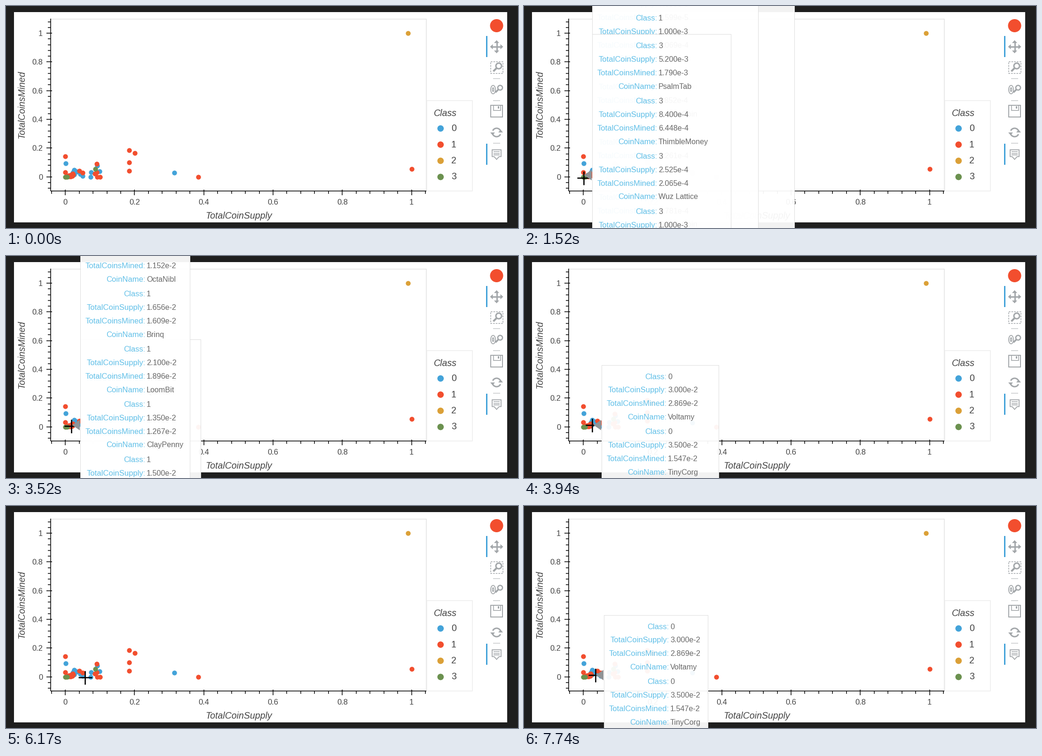
Recreate the animation shown at these times as a matplotlib script. Size 1089x474 px, loop 8 s.

```python
import math
import random

import numpy as np
import matplotlib.pyplot as plt
from matplotlib.animation import FuncAnimation
from matplotlib.collections import LineCollection
from matplotlib.patches import Arc, Circle, Ellipse, Polygon, Rectangle

W, H, DPI = 1089, 474, 64
LOOP, TICK = 8000, 20
PT = 72 / DPI  # points per pixel
COLORS = ["#43a3d9", "#f24e2e", "#dba037", "#6b914f"]
ICON = "#a3a7aa"
X0, XS, Y0, YS = 126.2, 736.4, 364.7, 306.6

plt.rcParams["font.family"] = "Liberation Sans"
fig = plt.figure(figsize=(W / DPI, H / DPI), dpi=DPI, facecolor="#1e1e1e")
ax = fig.add_axes([0, 0, 1, 1])
ax.set_xlim(0, W)
ax.set_ylim(H, 0)
ax.axis("off")


def rect(x0, y0, x1, y1, face="none", edge="none", lw=1.0, **kw):
    return ax.add_patch(Rectangle((x0, y0), x1 - x0, y1 - y0, fc=face, ec=edge,
                                  lw=lw * PT, **kw))


def lines(segs, color="black", lw=1.5, z=2):
    return ax.add_collection(LineCollection(segs, colors=color,
                                            linewidths=lw * PT, zorder=z))


def text(x, y, s, size, color="#444444", **kw):
    return ax.text(x, y, s, fontsize=size * PT, color=color, va="baseline", **kw)


def poly(pts, color=ICON, **kw):
    return ax.add_patch(Polygon(pts, fc=color, ec="none", **kw))


def magnifier(x, y, r, reach, lw):
    """Lens with a handle toward the lower left."""
    ax.add_patch(Circle((x, y), r, fc="none", ec=ICON, lw=lw * PT, zorder=2))
    lines([[(x - 0.7 * r, y + 0.7 * r), (x - reach, y + reach)]], ICON, lw + 1)


def draw_axes():
    rect(17, 13, 1066, 462, "white")
    rect(95, 27.5, 894, 395, edge="#e3e3e3", lw=1.5)
    segs = [[(95, 27), (95, 395)], [(95, 395), (894, 395)]]
    for i in range(-2, 28):
        big = i % 5 == 0
        label = f"{i / 25:.1f}" if i % 25 else str(i // 25)
        y = Y0 - YS * i / 25
        segs.append([(86 if big else 89, y), (98 if big else 95, y)])
        if big:
            text(78, y + 6, label, 16.5, ha="right")
        if -1 <= i <= 26:
            x = X0 + XS * i / 25
            segs.append([(x, 392 if big else 395), (x, 404 if big else 401)])
            if big:
                text(x, 424, label, 16.5, ha="center")
    lines(segs)
    text(495.5, 453.5, "TotalCoinSupply", 19.5, ha="center", style="italic")
    text(39, 210.5, "TotalCoinsMined", 19.5, ha="center", style="italic",
         rotation=90, rotation_mode="anchor")


def draw_legend():
    rect(894.5, 202, 992, 395, edge="#ededed", lw=1.5)
    text(910, 235, "Class", 19.5, style="italic")
    for i, color in enumerate(COLORS):
        y = 261.5 + 34.5 * i
        ax.add_patch(Circle((924.3, y), 6.8, fc=color, ec="none"))
        text(947, y + 5.5, str(i), 19.5)


def draw_points():
    rng = random.Random(4)
    blue = [(127, 336), (145, 350), (358, 355.5), (194, 341), (199, 353),
            (181, 355), (180, 364.5), (163, 363)]
    blue += [(rng.uniform(141, 160), rng.uniform(352, 361)) for _ in range(8)]
    red = [(126, 320.5), (126, 354.5), (262, 308), (262, 334), (262, 352),
           (273.5, 314), (409, 364.7), (862.7, 348.3), (193, 337), (193, 355),
           (189, 358), (156, 352), (163, 355.5), (194, 364.5), (200, 364.5)]
    for k in range(22):
        u = k / 21
        red.append((127 + 16 * u, 364.5 - 7 * u * rng.random()))
    gold = [(855.3, 58.3)]
    green = [(190, 348), (126, 364.5), (130, 364.5)]
    for i, pts in enumerate([blue, red, gold, green]):
        ax.scatter(*zip(*pts), s=(10.3 * PT) ** 2, c=COLORS[i], linewidths=0,
                   zorder=3 + i / 10)


def draw_toolbar():
    c = 1043.5
    ax.add_patch(Circle((c, 42), 14, fc=COLORS[1], ec="none"))
    for y in (64, 294):
        rect(1021, y, 1024, y + 45, COLORS[0])
    lines([[(1036, y), (1051, y)] for y in (155, 201.5, 293)], "#c6c9cb")
    # pan
    lines([[(c - 10, 87), (c + 10, 87)], [(c, 77), (c, 97)]], ICON, 3)
    for dx, dy in ((1, 0), (-1, 0), (0, 1), (0, -1)):
        poly([(c + a * dx + b * dy, 87 + a * dy + b * dx)
              for a, b in ((14, 0), (8, 5.5), (8, -5.5))])
    # box zoom
    rect(1031, 118.5, 1056.5, 144, edge=ICON, lw=1.5, ls=(0, (2.4, 1.4)))
    magnifier(1048, 128, 6, 11.5, 3)
    # wheel zoom
    for w, h in ((10, 18), (3, 8)):
        ax.add_patch(Ellipse((1036, 178.5), w, h, fc="none", ec=ICON, lw=1.8 * PT))
    magnifier(1051, 174.5, 5, 10, 2.6)
    # save
    rect(1031, 211.5, 1056, 237, edge=ICON, lw=2)
    rect(1036.5, 212, 1051.5, 223, edge=ICON, lw=1.6)
    rect(1046, 214, 1049, 219, ICON)
    # reset
    for side in (-1, 1):
        a = 105 + 90 * side
        ax.add_patch(Arc((c, 270), 18, 18, theta1=a + 10, theta2=a + 150,
                         ec=ICON, lw=3 * PT))
        x = c + 8.5 * side
        poly([(x - 5, 270), (x + 5, 270), (x, 270 - 6 * side)])
    # hover
    half = [(9.5, 307), (9.5, 321.5), (5.5, 321.5), (0, 327.5)]
    edge = [(c + dx, y) for dx, y in half] + [(c - dx, y) for dx, y in half[::-1]]
    ax.add_patch(Polygon(edge, fc="none", ec=ICON, lw=1.8 * PT))
    lines([[(c - 6.5, y), (c + 6.5, y)] for y in (311, 314.5, 318)], ICON)


LABELS = ["Class:", "TotalCoinSupply:", "TotalCoinsMined:", "CoinName:"]
ROW, ENTRY = 28.8, 117.9


def tip(left, width, mid, entries, z=10):
    """Tooltip centred on mid, with four rows per entry."""
    tall = ENTRY * len(entries) + 13
    top = mid - tall / 2
    arts = [rect(left + 0.5, top + 0.5, left + width, top + tall, "white",
                 "#dcdcdc", alpha=0.95, zorder=z)]
    for i, entry in enumerate(entries):
        for j, (label, value) in enumerate(zip(LABELS, entry)):
            y = top + 30.5 + ENTRY * i + ROW * j
            if 0 < y < H + 14:
                arts.append(text(left + 139.5, y, label, 16.6, "#62c0e8",
                                 ha="right", zorder=z + 0.1))
                arts.append(text(left + 142, y, value, 16.1, "#686868",
                                 zorder=z + 0.1))
    arts.append(poly([(left - 16, 361), (left, 350), (left, 372)] if mid > 350
                     else [(left - 16, mid), (left, mid - 11), (left, mid + 11)],
                     "#8f9396", zorder=9))
    return arts


def coins(n, cls, seed):
    rng = random.Random(seed)

    def num():
        return f"{rng.uniform(1, 9.9):.3f}e-{rng.randint(4, 6)}"
    names = ["MapleTok", "Quillbit", "Zumo", "PebbleCoin", "Norvik"]
    return [(cls, num(), num(), rng.choice(names)) for _ in range(n)]


def build_tips():
    threes = [("3", "5.200e-3", "1.790e-3", "PsalmTab"),
              ("3", "8.400e-4", "6.448e-4", "ThimbleMoney"),
              ("3", "2.525e-4", "2.065e-4", "Wuz Lattice"),
              ("3", "1.000e-3", "8.120e-4", "Zumo")] + coins(1, "3", 7)
    ones = [("1", "2.100e-2", "1.152e-2", "OctaNibl"),
            ("1", "1.656e-2", "1.609e-2", "Brinq"),
            ("1", "2.100e-2", "1.896e-2", "LoomBit"),
            ("1", "1.350e-2", "1.267e-2", "ClayPenny"),
            ("1", "1.500e-2", "1.184e-2", "Zumo")] + coins(2, "1", 5)
    zeros = [("0", "3.000e-2", "2.869e-2", "Voltamy"),
             ("0", "3.500e-2", "1.547e-2", "TinyCorg")]
    middle = coins(8, "1", 1)
    middle[1] = ("1", "1.000e-3", "7.069e-4", "Norvik")
    return [
        (1190, 3380, tip(144, 431, 361, coins(9, "0", 2))),
        (1330, 3380, tip(144, 354, 361, middle, 11) + tip(144, 296, 361, threes, 12)),
        (3380, 3870, tip(157, 257, 361, coins(3, "0", 4))),
        (3380, 3660, tip(157, 234, 357, ones, 11)),
        (3870, 4290, tip(164, 250, 356.5, zeros)),
        (4990, 5760, tip(212, 242, 337, coins(1, "1", 8))),
        (6300, 7180, tip(180, 250, 359, coins(2, "0", 9))),
        (7590, LOOP, tip(169, 222, 356.5, zeros)),
    ]


# cursor moves: start, end, steps, goal x, goal y
HOME = (970, 104)
MOVES = [(130, 910, 12, 129, 348), (980, 1520, 8, 127, 367),
         (3170, 3940, 12, 145, 361), (4010, 4780, 12, 190, 323),
         (4850, 5170, 5, 194, 337), (5700, 6380, 11, 165, 370),
         (7130, 7740, 10, 151.5, 361)]


def cursor(now):
    """Time of the latest step and the place reached by then."""
    stamp, (x, y) = 0, HOME
    for start, end, steps, gx, gy in MOVES:
        if now < start:
            break
        stamps = np.floor(np.linspace(start, end, steps) / 10 + 1e-6) * 10
        stamp = stamps[stamps <= now][-1]
        u = math.sin(math.pi / 2 * (stamp - start) / (end - start))
        dx, dy = gx - x, gy - y
        bow = 0.24 * abs(dx) * math.sin(math.pi * u) if abs(dx) > 100 else 0
        x, y = x + dx * u, y + dy * u + bow
    return stamp, x, y


draw_axes()
draw_legend()
draw_points()
draw_toolbar()
tips = build_tips()
cross = lines([], "black", 2.6, 8)


def update(i):
    t, x, y = cursor(i * TICK + 10)
    cross.set_segments([[(x - 14.5, y), (x + 14.5, y)],
                        [(x, y - 14.5), (x, y + 14.5)]] if t else [])
    for start, end, arts in tips:
        for art in arts:
            art.set_visible(start <= t < end)
    return [cross]


anim = FuncAnimation(fig, update, frames=LOOP // TICK, interval=TICK,
                     repeat=True, repeat_delay=0, cache_frame_data=False)
plt.show()
```
